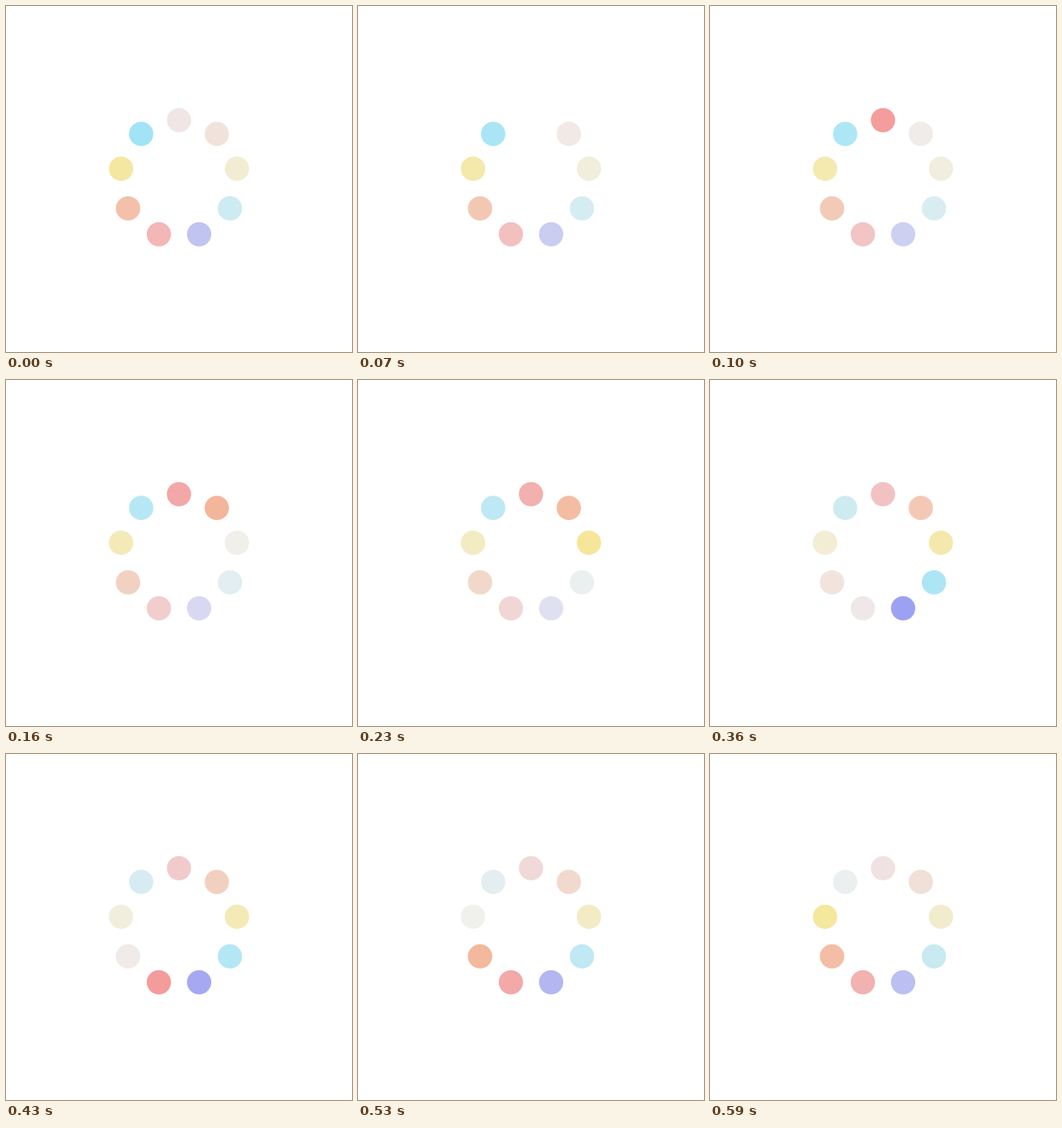
An HTML page that plays this animation: 467x467 px, repeating every 630 ms.

```html
<!DOCTYPE html>
<html lang="en">
<head>
<meta charset="utf-8">
<title>Loading dots</title>
<style>
  html, body { margin: 0; width: 100%; height: 100%; overflow: hidden; background: #fff; }
  svg { display: block; width: 100vw; height: 100vh; }
</style>
</head>
<body>
<svg viewBox="0 0 467 467"></svg>
<script>
const LOOP = 630;
const COUNT = 9;
const CENTER = 233.5, RING = 79.4, RADIUS = 16.4;
const GREY = 240;
const STARTS = [0, 30, 70, 100, 130, 160, 200, 230, 260, 300, 330, 360, 400, 430, 460, 490, 530, 560, 590];
const COLORS = [
  [243, 154, 153], // red
  [244, 180, 150], // orange
  [245, 230, 151], // yellow
  [161, 228, 245], // cyan
  [155, 159, 242]  // violet
];

const svg = document.querySelector('svg');
const dots = Array.from({ length: COUNT }, (_, i) => {
  const angle = i * 2 * Math.PI / COUNT;
  const el = document.createElementNS('http://www.w3.org/2000/svg', 'circle');
  el.setAttribute('cx', CENTER + RING * Math.sin(angle));
  el.setAttribute('cy', CENTER - RING * Math.cos(angle));
  el.setAttribute('r', RADIUS);
  svg.append(el);
  return { el, color: COLORS[i % COLORS.length], offset: (i + 1) / COUNT };
});

function draw(ms) {
  const step = STARTS.findLastIndex(start => start <= ms);
  const phase = step / STARTS.length;
  for (const { el, color, offset } of dots) {
    const strength = 1 - (phase - offset + 1) % 1;
    const rgb = color.map(c => Math.round(GREY + (c - GREY) * strength));
    el.setAttribute('fill', `rgb(${rgb})`);
    // A fully faded dot drops out just before it lights up again.
    el.setAttribute('visibility', strength < 0.01 ? 'hidden' : 'visible');
  }
}

const begin = performance.now();
function tick() {
  draw((performance.now() - begin) % LOOP);
  requestAnimationFrame(tick);
}
tick();
</script>
</body>
</html>
```
